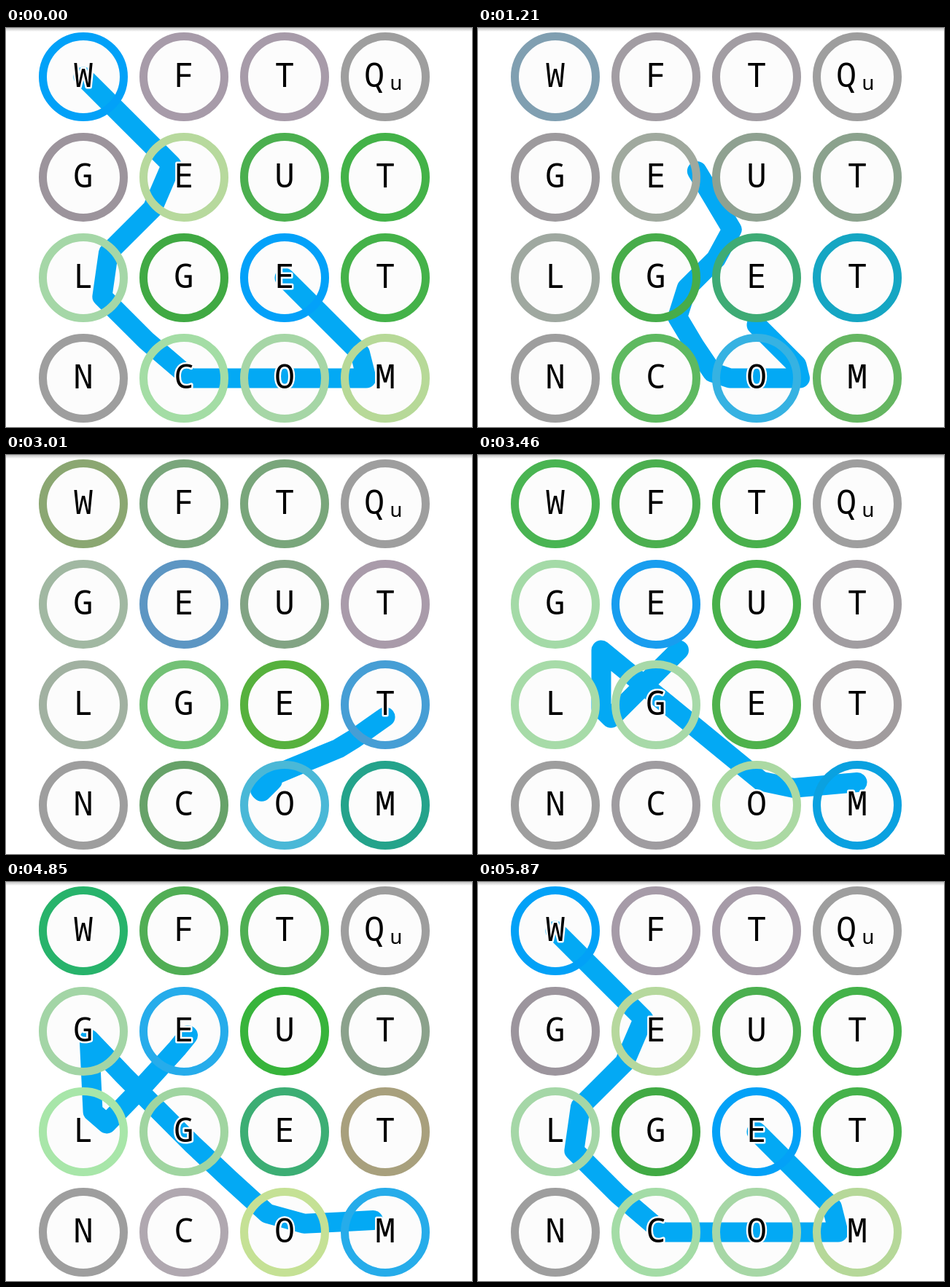
An HTML page for the animation above (5.95 s loop, 639 by 548 pixels).

```html
<!DOCTYPE html>
<html lang="en">
<head>
<meta charset="utf-8">
<title>Letter grid</title>
<style>
  html, body { margin: 0; width: 100%; height: 100%; overflow: hidden; background: #fff; }
  svg { display: block; width: 100%; height: 100%; }
  .disc { fill: #fcfcfc; }
  .ring { fill: none; stroke-width: 11; }
  #trail { fill: none; stroke: #03a9f4; stroke-width: 27; stroke-linecap: round; stroke-linejoin: round; }
  text {
    font: 46px "Noto Sans Mono", "DejaVu Sans Mono", monospace;
    text-anchor: middle;
    fill: #000; stroke: #fff; stroke-width: 5; stroke-linejoin: round; paint-order: stroke;
  }
  .small { font-size: 28px; }
</style>
</head>
<body>
<svg viewBox="0 0 639 548">
  <defs>
    <linearGradient id="shade" x2="0" y2="1">
      <stop offset="0" stop-color="#c4c4c4"/>
      <stop offset="1" stop-color="#fff"/>
    </linearGradient>
  </defs>
  <g id="discs"></g>
  <polyline id="trail"/>
  <g id="rings"></g>
  <g id="letters"></g>
  <rect width="639" height="5" fill="url(#shade)"/>
</svg>
<script>
const LOOP = 5950, FRAME = 77, SAMPLES = 16, MOVE_FRAMES = 14;
const LETTERS = [..."WFTQGEUTLGETNCOM"];

// cells: board indexes along the word; colors: ring colour of each cell once settled
const WORDS = [
  { start: 4850, cells: [0, 5, 8, 13, 14, 15, 10],
    colors: "00a0ff ab9aad ab9aad 9e9e9e 9c919c bedb99 4caf50 40b345 a5d6a7 3ca73f 00a0ff 3fb347 9e9e9e a3dfa5 a5d6a7 bedb94" },
  { start: 890, cells: [11, 14],
    colors: "be9e8b 9e9e9e 9e9e9e 9e9e9e 9e9e9e 9190a1 af9ab0 af9ab0 9c919c 4caf50 5cb131 00a0ff 9e9e9e 3ca73f 00a0ff 39a449" },
  { start: 2920, cells: [15, 14, 9, 4, 8, 5],
    colors: "31b846 3ab33f 38b43c 9e9e9e a5e6a9 00a0ff 32b536 9e9e9e a9eaaa b9e1ba 4bb251 c29b8a 9e9e9e b39ab3 cde491 00a0ff" }
];

const center = i => [106 + 138 * (i % 4), 67 + 138 * Math.floor(i / 4)];
const mix = (a, b, k) => a.map((v, i) => v + (b[i] - v) * k);
const rgb = hex => [0, 2, 4].map(i => parseInt(hex.slice(i, i + 2), 16));

// Evenly spread samples over the letters; the last ones rest on the final letter.
function sample(cells) {
  const last = cells.length - 1;
  return Array.from({ length: SAMPLES }, (_, i) => {
    const pos = Math.min(i * cells.length / SAMPLES, last);
    const from = Math.min(Math.floor(pos), last - 1);
    return mix(center(cells[from]), center(cells[from + 1]), pos - from);
  });
}

for (const word of WORDS) {
  word.points = sample(word.cells);
  word.rings = word.colors.split(" ").map(rgb);
}

function bezier(x1, y1, x2, y2) {
  const at = (a, b, s) => 3 * (1 - s) * (1 - s) * s * a + 3 * (1 - s) * s * s * b + s * s * s;
  return x => {
    if (x >= 1) return 1;
    let lo = 0, hi = 1;
    for (let i = 0; i < 30; i++) {
      const mid = (lo + hi) / 2;
      if (at(x1, x2, mid) < x) lo = mid; else hi = mid;
    }
    return at(y1, y2, lo);
  };
}
const glide = bezier(.24, .05, .46, 1);

function add(parent, tag, attrs, text = "") {
  const el = document.createElementNS("http://www.w3.org/2000/svg", tag);
  for (const name in attrs) el.setAttribute(name, attrs[name]);
  el.textContent = text;
  return document.getElementById(parent).appendChild(el);
}

const rings = LETTERS.map((letter, i) => {
  const [cx, cy] = center(i);
  add("discs", "circle", { cx, cy, r: 55, class: "disc" });
  add("letters", "text", { x: letter === "Q" ? cx - 15 : cx, y: cy + 14 }, letter);
  if (letter === "Q") add("letters", "text", { x: cx + 15, y: cy + 18, class: "small" }, "u");
  return add("rings", "circle", { cx, cy, r: 55.5, class: "ring" });
});
const trail = document.getElementById("trail");

function draw(time) {
  let t = time % LOOP;
  if (t < WORDS[1].start) t += LOOP;
  const now = t >= WORDS[0].start ? 0 : t >= WORDS[2].start ? 2 : 1;
  const to = WORDS[now], from = WORDS[(now + 2) % 3];
  const n = Math.floor((t - to.start) / FRAME) + 1;
  const move = glide(n / MOVE_FRAMES);
  const tint = 1 - Math.pow(.8, n);

  trail.setAttribute("points", from.points.map((p, i) =>
    mix(p, to.points[i], move).map(v => v.toFixed(2)).join()).join(" "));
  rings.forEach((ring, i) => {
    const c = mix(from.rings[i], to.rings[i], tint).map(Math.round);
    ring.setAttribute("stroke", `rgb(${c})`);
  });
}

const begin = performance.now();
function tick() {
  draw(performance.now() - begin);
  requestAnimationFrame(tick);
}
tick();
</script>
</body>
</html>
```
